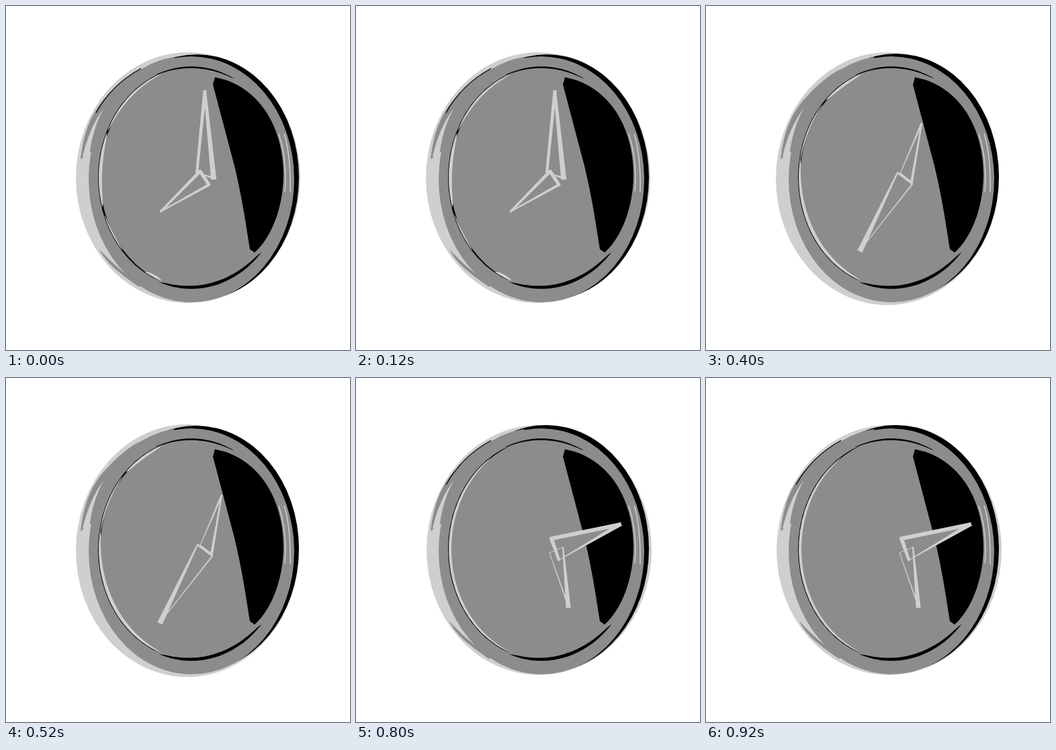
These frames come from a looping animation (512x512 px, 1 s). An HTML page:

```html
<!DOCTYPE html>
<html lang="en">
<head>
<meta charset="utf-8">
<title>Sketched clock</title>
<style>
  html, body { margin: 0; width: 100%; height: 100%; overflow: hidden; background: #fff; }
  svg { display: block; width: 100%; height: 100%; }
  .grey { fill: #8c8c8c; }
  .light { fill: #cfcfcf; }
  .line { fill: none; stroke: #cfcfcf; stroke-width: 1.5; }
</style>
</head>
<body>
<svg viewBox="0 0 512 512">
  <ellipse id="halo" class="light"/>
  <ellipse id="side"/>
  <path class="grey" d="M111 228C116 185 128 160 145 140C165 118 185 100 203 93Q225 80 250 76L260 110L150 200Z"/>
  <path id="nick" fill="none" stroke="#000" stroke-width="1.3" d="M134 159Q157 117 201 93"/>
  <path class="light" d="M146 152C131 170 120 198 114 224L124 225C126 200 134 172 146 152Z"/>
  <path id="chip" class="grey" d="M139 362C148 381 166 396 198 418L202 415C175 398 155 380 139 362Z"/>
  <ellipse class="grey" cx="276" cy="258" rx="153" ry="183"/>
  <path id="groove"/>
  <path id="glint" class="light"/>
  <path d="M311 106L327 110C385 130 413 190 413 250C413 300 395 345 370 367L363 362C355 310 350 280 340 238L308 117Z"/>
  <path class="line" d="M414 190Q424 222 423 277M406 190Q419 230 415 276"/>
  <path id="fill" class="grey"/>
  <path id="hands" class="light"/>
</svg>
<script>
const HOLD = 200;
const $ = id => document.getElementById(id);

// halo: left, right, top, bottom; side: cx, cy, rx, ry; glints: start angle, end angle, width
// hand: corners a, b, tip, then edge weights a-tip, b-tip, a-b (start, end)
const poses = [
  {
    halo: [104, 438, 69, 442], side: [284, 255, 152, 183], nick: 1, chip: 1,
    glints: [[205, 251, 3], [164, 204, 5], [138, 160, 2], [109, 120, 4]],
    hands: [[284, 248, 309, 256, 296, 127, 4, 5, 8, 4, 0, 4],
            [289, 246, 302, 266, 230, 306, 5, 3, 4, 2, 5, 5]]
  },
  {
    halo: [102, 436, 67, 445], side: [283, 252, 153, 183], nick: 1, chip: 1,
    glints: [[234, 251, 4], [150, 206, 4], [109, 127, 4]],
    hands: [[294, 273, 305, 246, 185, 212, 6, 7, 1, 4, 4, 6],
            [291, 263, 305, 246, 237, 199, 3, 4, 6, 2, 4, 4]]
  },
  {
    halo: [104, 436, 69, 445], side: [283, 254, 153, 183], nick: 0, chip: 0,
    glints: [[225, 251, 4], [188, 222, 2], [109, 191, 5]],
    hands: [[285, 248, 307, 265, 230, 363, 2, 8, 2, 1, 3, 2],
            [289, 249, 306, 262, 321, 175, 1, 3, 4, 2, 2, 2]]
  },
  {
    halo: [106, 436, 67, 442], side: [283, 255, 152, 183], nick: 0, chip: 1,
    glints: [[234, 251, 2], [109, 207, 3]],
    hands: [[309, 249, 289, 266, 356, 355, 5, 4, 1, 4, 1, 1],
            [299, 247, 297, 267, 368, 261, 2, 6, 5, 6, 2, 2]]
  },
  {
    halo: [105, 440, 70, 442], side: [283, 254, 153, 184], nick: 1, chip: 1,
    glints: [[109, 238, 4]],
    hands: [[288, 260, 308, 252, 316, 340, 1, 2, 2, 7, 1, 1],
            [291, 239, 302, 271, 393, 218, 6, 6, 1, 6, 6, 4]]
  }
];

function setEllipse(id, cx, cy, rx, ry) {
  Object.entries({ cx, cy, rx, ry }).forEach(([k, v]) => $(id).setAttribute(k, v));
}

// A sliver along the dial's edge, thin at both ends.
function sliver(from, to, width, grow = 0) {
  const outer = [], inner = [];
  for (let i = 0; i <= 24; i++) {
    const a = (from + (to - from) * i / 24) * Math.PI / 180;
    const w = width * Math.sqrt(Math.sin(Math.PI * i / 24));
    const at = r => [276 + (138 + r) * Math.cos(a), 255 + (163 + r) * Math.sin(a)]
      .map(v => v.toFixed(2)).join(" ");
    outer.push(at(grow));
    inner.unshift(at(grow - w));
  }
  return "M" + outer.concat(inner).join("L") + "Z";
}

function taper(x1, y1, x2, y2, w1, w2) {
  const len = Math.hypot(x2 - x1, y2 - y1);
  const ux = (x2 - x1) / len / 2, uy = (y2 - y1) / len / 2;
  const pt = (x, y, w, side, end) =>
    `${x - side * uy * w + end * ux * w * .6} ${y + side * ux * w + end * uy * w * .6}`;
  return `M${pt(x1, y1, w1, 1, -1)}L${pt(x2, y2, w2, 1, 1)}` +
         `L${pt(x2, y2, w2, -1, 1)}L${pt(x1, y1, w1, -1, -1)}Z`;
}

function outline([ax, ay, bx, by, tx, ty, a1, a2, b1, b2, c1, c2]) {
  return taper(ax, ay, tx, ty, a1, a2) + taper(tx, ty, bx, by, b2, b1) +
         taper(ax, ay, bx, by, c1, c2);
}

const body = ([ax, ay, bx, by, tx, ty]) => `M${ax} ${ay}L${bx} ${by}L${tx} ${ty}Z`;

$("groove").setAttribute("d",
  sliver(109, 251, 3, 1) + sliver(247, 297, 2.5, 2) + sliver(42, 110, 5, 3));

function draw(pose) {
  const [l, r, t, b] = pose.halo;
  setEllipse("halo", (l + r) / 2, (t + b) / 2, (r - l) / 2, (b - t) / 2);
  setEllipse("side", ...pose.side);
  $("nick").setAttribute("opacity", pose.nick);
  $("chip").setAttribute("opacity", pose.chip);
  $("glint").setAttribute("d", pose.glints.map(g => sliver(...g)).join(""));
  $("fill").setAttribute("d", pose.hands.map(body).join(""));
  $("hands").setAttribute("d", pose.hands.map(outline).join(""));
}

const start = performance.now();
function tick() {
  const time = Math.max(0, performance.now() - start);
  draw(poses[Math.floor(time / HOLD) % poses.length]);
  requestAnimationFrame(tick);
}
tick();
</script>
</body>
</html>
```
